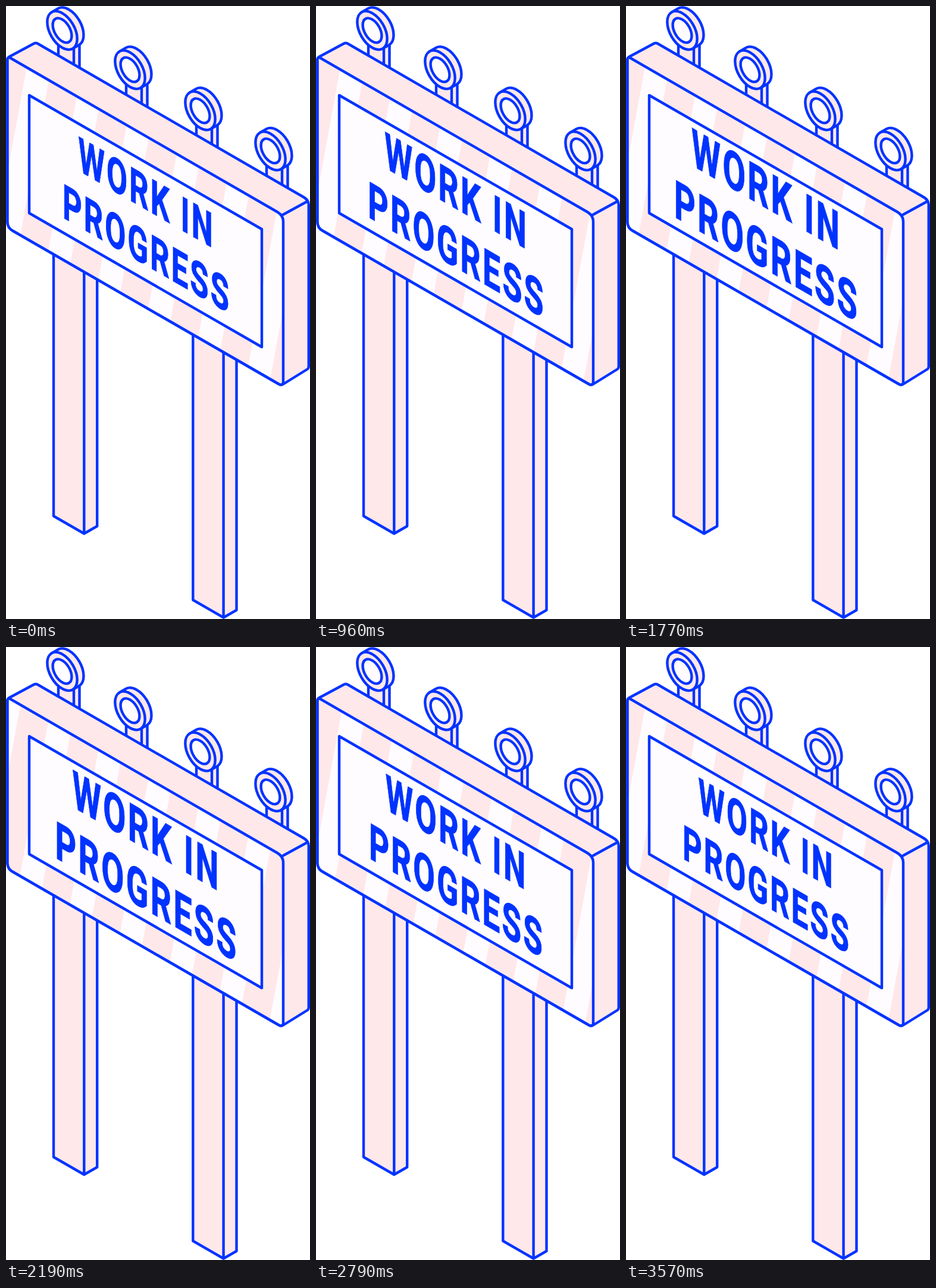
These frames come from a looping animation (511 by 1030 pixels, 3.6 s). An HTML page:

```html
<!DOCTYPE html>
<html lang="en">
<head>
<meta charset="utf-8">
<title>Work in progress</title>
<style>
  html, body { margin: 0; width: 100%; height: 100%; overflow: hidden; background: #fff; }
  svg { display: block; width: 100%; height: 100%; }
  .ink { stroke: #03f; stroke-width: 4.4; stroke-linejoin: round; stroke-linecap: round; }
  .pink { fill: #ffe8ea; }
  .pale { fill: #fffcff; }
  .none { fill: none; }
  text {
    font: 700 80.5px Roboto, "Open Sans", sans-serif;
    letter-spacing: 5px;
    text-anchor: middle; fill: #03f; stroke: #03f; stroke-width: 1;
  }
</style>
</head>
<body>
<svg viewBox="0 0 511 1030">
  <defs>
    <path id="face" d="M5 86 L456 346 Q466 352 466 362 V633 Q465 637 460 636 L12 378 Q2.500 373 2.500 363 V90 Q2.500 87 5 86 Z"/>
    <clipPath id="clip"><use href="#face"/></clipPath>
    <g id="pole" class="ink pink">
      <path d="M80 400 V857 L131.300 886.500 L153.200 874 V400 Z"/>
      <path d="M131.300 400 V886"/>
    </g>
    <g id="lamp" class="ink pink">
      <path d="M88 55 H123.500 V114 H88 Z M114 55 V114"/>
      <g transform="translate(94.500 41) rotate(60)">
        <path d="M-35.300 0 V-12.500 A35.300 20.700 0 0 1 35.300 -12.500 V0 Z"/>
        <ellipse rx="35.300" ry="20.700"/>
        <ellipse class="pale" rx="22.500" ry="13"/>
      </g>
    </g>
  </defs>

  <use href="#pole"/>
  <use href="#pole" x="234.300" y="141"/>
  <use href="#lamp"/>
  <use href="#lamp" x="114" y="66"/>
  <use href="#lamp" x="232" y="135"/>
  <use href="#lamp" x="350" y="202.500"/>

  <path class="ink pink" d="M2.500 90 Q2.500 87 6 85 L47 63 Q50 61.500 53 63 L500 321 Q508.800 326 508.800 334 V606 Q508.800 608 507 610 L465 636 Q462 637.500 458 635 L12 378 Q2.500 373 2.500 363 Z"/>
  <use href="#face" class="pale"/>
  <g clip-path="url(#clip)">
    <!-- x runs along the top edge, y from the top edge (0) to the bottom (1) -->
    <g transform="matrix(1 .577 -47.700 259.500 0 85)">
      <g id="stripes" class="pink"></g>
    </g>
  </g>
  <use href="#face" class="ink none"/>
  <path class="ink none" d="M464 351.500 L507 328"/>
  <path class="ink pale" d="M39 150 L430 375 V573 L39 348 Z"/>

  <g id="label">
    <g transform="matrix(.63 .3635 0 1 0 0)">
      <text x="1" y="-25">WORK IN</text>
      <text x="1.500" y="69">PROGRESS</text>
    </g>
  </g>
</svg>
<script>
  const LOOP = 3600, STRIPE_TIME = 900, GAP = 84, BAND = 47, START = 71.5;
  const stripes = document.getElementById("stripes");
  const label = document.getElementById("label");

  for (let k = -2; k < 7; k++) {
    const band = document.createElementNS("http://www.w3.org/2000/svg", "rect");
    const box = { x: k * GAP, y: -0.2, width: BAND, height: 1.4 };
    for (const key in box) band.setAttribute(key, box[key]);
    stripes.append(band);
  }

  const smooth = x => x * x * (3 - 2 * x);

  function draw(time) {
    const t = time % LOOP;
    const shift = (START + GAP * t / STRIPE_TIME) % GAP;
    stripes.setAttribute("transform", `translate(${shift} 0)`);

    // The lettering swells for half the loop, then shrinks back.
    const half = LOOP / 2;
    const scale = 1 + 0.1 * smooth(1 - Math.abs(t - half) / half);
    label.setAttribute("transform", `translate(235.5 367) scale(${scale})`);
  }

  const begin = performance.now();
  function tick() {
    draw(performance.now() - begin);
    requestAnimationFrame(tick);
  }
  tick();
</script>
</body>
</html>
```
